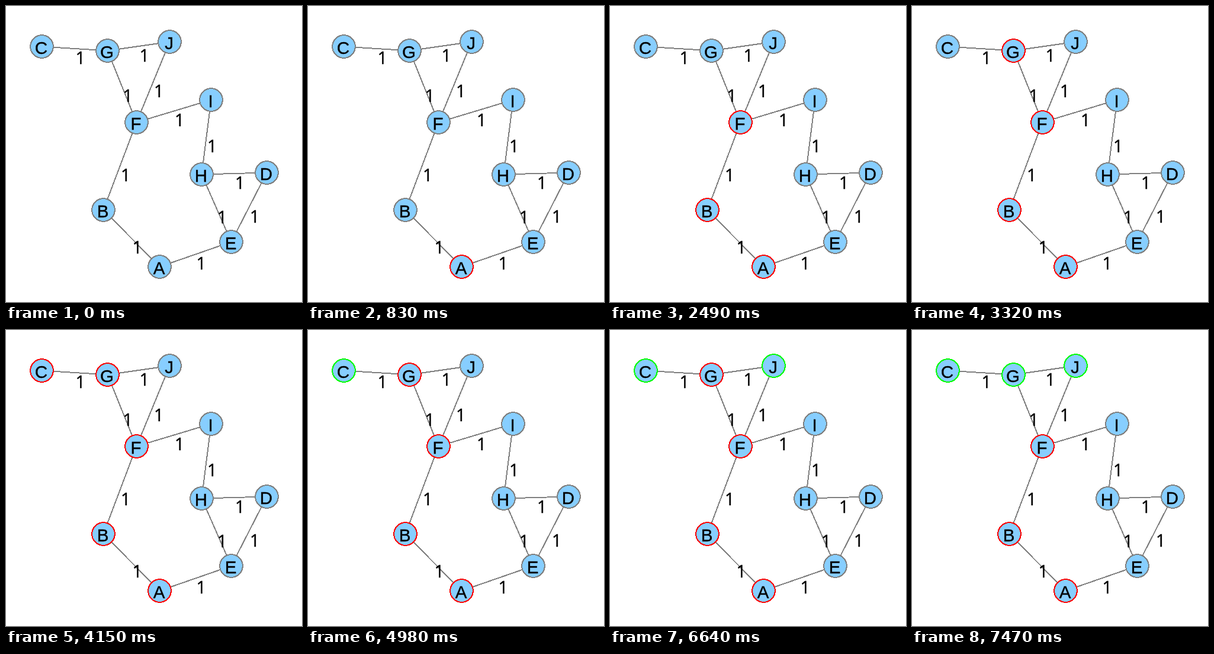
An HTML page that plays this animation: 500x500 px, repeating every 8000 ms.

```html
<!DOCTYPE html>
<html lang="en">
<head>
<meta charset="utf-8">
<title>Graph traversal</title>
<style>
  html, body { margin: 0; width: 100%; height: 100%; overflow: hidden; background: #fff; }
  svg { display: block; width: 100vw; height: 100vh; }
  line, circle { stroke: #808080; stroke-width: 2; shape-rendering: crispEdges; }
  circle { fill: #87ceff; }
  text { fill: #000; stroke: #000; stroke-width: 0.4; }
  .name { font: 29.5px "Liberation Sans", Arial, sans-serif; text-anchor: middle; }
  .weight { font: 28.5px "Open Sans", "Noto Sans", sans-serif; }
</style>
</head>
<body>
<svg id="graph" viewBox="0 0 500 500"></svg>
<script>
const LOOP = 8000, STEP = 830;
const nodes = {
  A: [259, 440], B: [164, 344], C: [60, 68], D: [440, 281], E: [380, 398],
  F: [220, 196], G: [171, 75], H: [330, 284], I: [346, 158], J: [276, 60]
};
const edges = ['CG', 'GJ', 'GF', 'JF', 'FI', 'FB', 'IH', 'HD', 'HE', 'DE', 'BA', 'AE'];
// One visit per step: red on entering a node, green on leaving it.
const visits = ['A red', 'B red', 'F red', 'G red', 'C red', 'C lime', 'J red', 'J lime', 'G lime'];

const svg = document.getElementById('graph');
const rings = {};

function add(tag, attrs, content = '') {
  const el = document.createElementNS('http://www.w3.org/2000/svg', tag);
  for (const key in attrs) el.setAttribute(key, attrs[key]);
  el.textContent = content;
  return svg.appendChild(el);
}

for (const [a, b] of edges) {
  const [x1, y1] = nodes[a], [x2, y2] = nodes[b];
  add('line', { x1: x1 + 0.5, y1: y1 + 0.5, x2: x2 + 0.5, y2: y2 + 0.5 });
}
for (const name in nodes) {
  const [x, y] = nodes[name];
  rings[name] = add('circle', { cx: x + 0.5, cy: y + 0.5, r: 19.3 });
  add('text', { class: 'name', x: x - 0.5, y: y + 13 }, name);
}
for (const [a, b] of edges) {
  const [x1, y1] = nodes[a], [x2, y2] = nodes[b];
  add('text', { class: 'weight', x: (x1 + x2) / 2 + 2, y: Math.round((y1 + y2) / 2) + 26 }, '1');
}

let shown = -1;
function draw(now) {
  const step = Math.floor((now % LOOP) / STEP);
  if (step !== shown) {
    const colors = {};
    for (const visit of visits.slice(0, step)) {
      const [name, color] = visit.split(' ');
      colors[name] = color;
    }
    for (const name in rings) rings[name].style.stroke = colors[name] || '';
    shown = step;
  }
  requestAnimationFrame(draw);
}
draw(performance.now());
</script>
</body>
</html>
```
